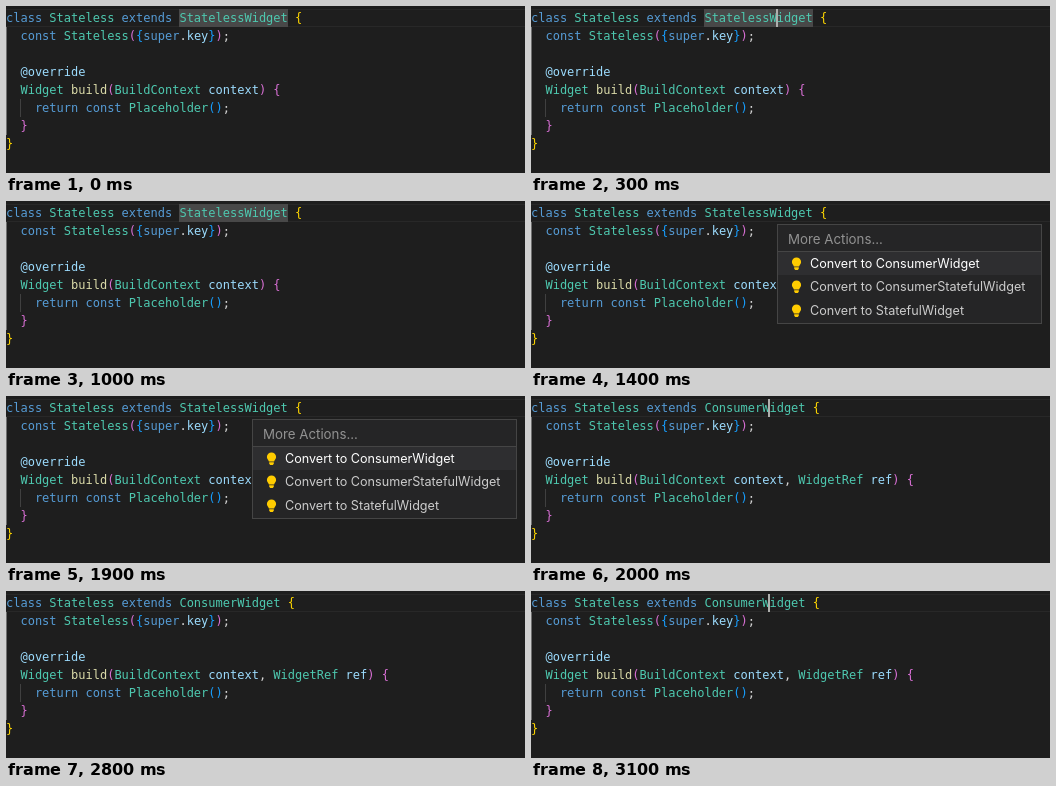
Write an HTML page that moves like this. It is 519x167 px and loops after 3200 ms.

```html
<!DOCTYPE html>
<html lang="en">
<head>
<meta charset="utf-8">
<title>Convert widget</title>
<style>
  html, body { margin: 0; width: 100%; height: 100%; overflow: hidden; background: #1e1e1e; }
  #stage { position: relative; width: 519px; height: 167px; overflow: hidden; background: #1e1e1e; }
  #stage div { position: absolute; box-sizing: border-box; }
  #line { left: 0; top: 3px; width: 519px; height: 18px; border: solid #282828; border-width: 1px 0; }
  #word { left: 173px; top: 3px; width: 109px; height: 18px; background: #484848; }
  #code .row { left: 0; height: 18px; white-space: pre; color: #d4d4d4;
    font: 12px/18px "DejaVu Sans Mono", monospace; font-variant-ligatures: none; }
  .guide { width: 1px; background: #404040; }
  #caret { top: 3px; width: 2px; height: 18px; background: #aeafad; }
  #menu { left: 246px; top: 23px; width: 265px; height: 100px; background: #252526;
    border: 1px solid #454545; font-family: Inter, sans-serif; white-space: pre; }
  #menu .head { left: 10px; top: 2px; font-size: 13.3px; line-height: 24px; color: #929292; }
  #menu .item { left: 0; width: 263px; height: 24px; padding-left: 32px;
    font-size: 12.6px; line-height: 24px; color: #cccccc; }
  #menu .picked { background: #2e2e30; color: #fff; border-top: 1px solid #454545; line-height: 23px; }
  #menu svg { position: absolute; left: 13px; top: 5px; }
  .k { color: #569cd6; } .t { color: #4ec9b0; } .v { color: #9cdcfe; } .f { color: #dcdcaa; }
  .g { color: #ffd700; } .p { color: #da70d6; } .b { color: #179fff; }
</style>
</head>
<body>
<div id="stage">
  <div id="line"></div>
  <div id="word"></div>
  <div class="guide" style="left:0;top:21px;height:108px;background:#707070"></div>
  <div class="guide" style="left:14px;top:93px;height:18px"></div>
  <div id="code"></div>
  <div id="caret"></div>
  <div id="menu"><div class="head">More Actions...</div></div>
</div>
<script>
const LOOP = 3200, CHAR = 7.224;
const $ = id => document.getElementById(id);

// Tokens are written as "style:text" pieces separated by "|".
const head = base => `k:class |t:Stateless |k:extends |t:${base} |g:{`;
const build = extra => `t:  Widget |f:build|p:(|t:BuildContext |v:context${extra}|p:) {`;
const lines = [
  head("StatelessWidget"),
  "k:  const |t:Stateless|p:(|b:{|k:super|d:.|v:key|b:}|p:)|d:;",
  "",
  "v:  @override",
  build(""),
  "k:    return const |t:Placeholder|b:()|d:;",
  "p:  }",
  "g:}"
];
const converted = { 0: head("ConsumerWidget"), 4: build("|d:, |t:WidgetRef |v:ref") };

const markup = line => line && line.split("|").map(part =>
  `<span class="${part[0]}">${part.slice(2)}</span>`).join("");

const rows = lines.map((line, i) => {
  const row = document.createElement("div");
  row.className = "row";
  row.style.top = 3 + 18 * i + "px";
  row.innerHTML = markup(line);
  $("code").append(row);
  return row;
});

const bulb = `<svg width="11" height="14" viewBox="0 0 11 14">
  <path d="M5.5 .5a4.6 4.6 0 0 1 4.6 4.6c0 2-1.4 2.8-2 4.4h-5.2c-.6-1.6-2-2.4-2-4.4A4.6 4.6 0 0 1 5.5 .5z
    M3.2 10.2h4.6v1.5l-1 1.3h-2.6l-1-1.3z" fill="#fc0"/></svg>`;
["ConsumerWidget", "ConsumerStatefulWidget", "StatefulWidget"].forEach((name, i) => {
  const item = document.createElement("div");
  item.className = i ? "item" : "item picked";
  item.style.top = 26 + 24 * i + "px";
  item.innerHTML = bulb + "Convert to " + name;
  $("menu").append(item);
});

// [start, phase, caret on]
const steps = [
  [0, "select", 0], [300, "select", 1], [800, "select", 0],
  [1200, "menu", 0],
  [2000, "done", 1], [2500, "done", 0], [3000, "done", 1]
];
const show = (id, on) => $(id).style.visibility = on ? "visible" : "hidden";
let current;

function apply(step) {
  const [, phase, caret] = step, done = phase === "done";
  show("word", phase === "select");
  show("menu", phase === "menu");
  show("caret", caret);
  $("caret").style.left = Math.floor((done ? 33 : 34) * CHAR) - (done ? 1 : 0) + "px";
  for (const i in converted) rows[i].innerHTML = markup(done ? converted[i] : lines[i]);
}

const start = performance.now();
function tick() {
  const t = (performance.now() - start) % LOOP;
  const step = steps.findLast(s => s[0] <= t);
  if (step !== current) apply(current = step);
  requestAnimationFrame(tick);
}
tick();
</script>
</body>
</html>
```
